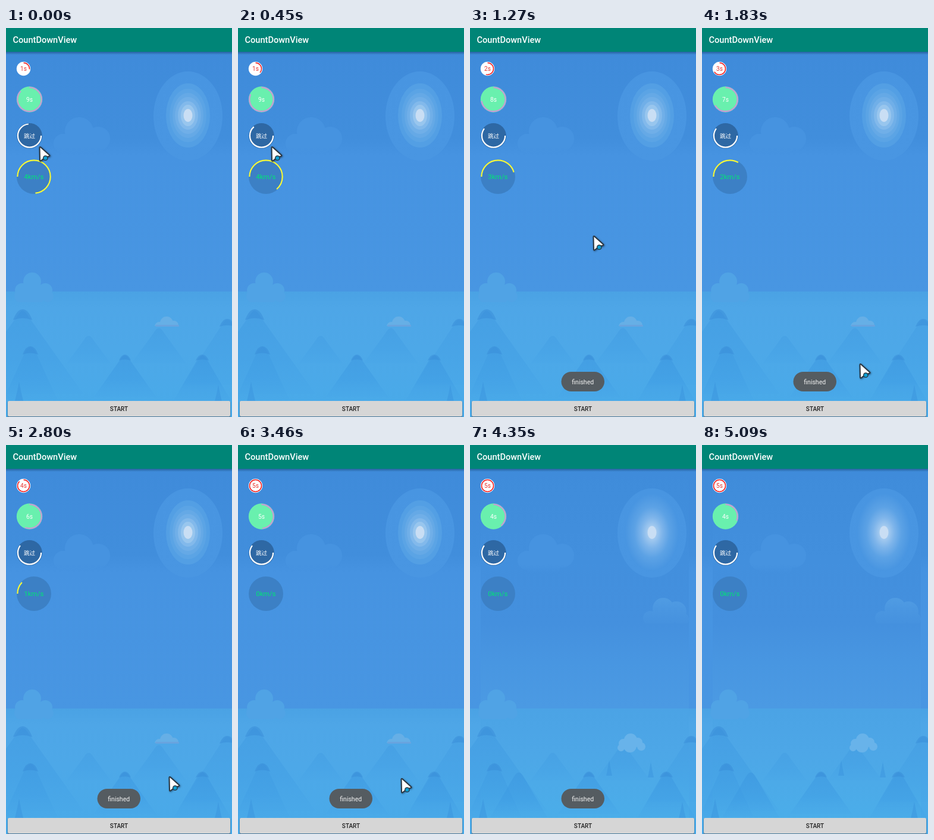
These frames come from a looping animation (380x654 px, 5190 ms). An HTML page with a canvas:

```html
<!DOCTYPE html>
<html lang="en">
<head>
<meta charset="utf-8">
<title>CountDownView</title>
<style>
html, body { margin: 0; width: 100%; height: 100%; overflow: hidden; background: #4896e2; }
canvas { display: block; }
</style>
</head>
<body>
<canvas id="stage" width="380" height="654"></canvas>
<script>
const ctx = document.getElementById("stage").getContext("2d");
const W = 380, H = 654, LOOP = 5190, LAST = 5090, TAU = Math.PI * 2;
const SKIP_AT = 600;

// Cursor tip: time, x, y
const path = [
  [0, 56, 199], [600, 56, 199], [870, 132, 223], [1070, 194, 308], [1270, 207, 349],
  [1610, 213, 423], [1830, 265, 564], [1920, 267, 567], [2130, 274, 557], [2800, 274, 557],
  [3200, 275, 559], [3760, 273, 561], [3880, 316, 588], [4020, 342, 618], [4150, 342, 660]
];

const clamp = v => Math.max(0, Math.min(1, v));

function cursorAt(t) {
  const i = path.findIndex(p => p[0] > t);
  if (i < 0) return path[path.length - 1].slice(1);
  const [t0, x0, y0] = path[i - 1], [t1, x1, y1] = path[i];
  const k = (t - t0) / (t1 - t0);
  return [x0 + (x1 - x0) * k, y0 + (y1 - y0) * k];
}

function vertical(y0, y1, ...stops) {
  const g = ctx.createLinearGradient(0, y0, 0, y1);
  stops.forEach(([y, color]) => g.addColorStop((y - y0) / (y1 - y0), color));
  return g;
}

function ellipse(x, y, rx, ry, fill) {
  ctx.beginPath();
  ctx.ellipse(x, y, rx, ry, 0, 0, TAU);
  ctx.fillStyle = fill;
  ctx.fill();
}

const disc = (x, y, r, fill) => ellipse(x, y, r, r, fill);

function box(x, y, w, h, r, fill) {
  ctx.beginPath();
  ctx.roundRect(x, y, w, h, r);
  ctx.fillStyle = fill;
  ctx.fill();
}

function arc(x, y, r, start, sweep, width, color) {
  if (sweep <= 0) return;
  const from = start * TAU / 360;
  ctx.beginPath();
  ctx.arc(x, y, r, from, from + Math.min(sweep, 360) * TAU / 360);
  ctx.strokeStyle = color;
  ctx.lineWidth = width;
  ctx.stroke();
}

function label(text, x, y, size, color, weight = 400, align = "center") {
  ctx.font = `${weight} ${size}px Roboto, "Noto Sans CJK SC", "Noto Sans CJK", sans-serif`;
  ctx.textAlign = align;
  ctx.fillStyle = color;
  ctx.fillText(text, x, y);
}

// Puffs are [x, y, radius]; everything below the base line is cut off.
function cloud(puffs, base, fill) {
  ctx.save();
  ctx.beginPath();
  ctx.rect(0, 0, W, base);
  ctx.clip();
  ctx.beginPath();
  for (const [x, y, r] of puffs) {
    ctx.moveTo(x + r, y);
    ctx.arc(x, y, r, 0, TAU);
  }
  ctx.fillStyle = fill;
  ctx.fill();
  ctx.restore();
}

function peak(x, y, half, h, alpha) {
  ctx.beginPath();
  ctx.moveTo(x - half, y + h);
  ctx.lineTo(x - 9, y + 9);
  ctx.quadraticCurveTo(x, y - 8, x + 9, y + 9);
  ctx.lineTo(x + half, y + h);
  ctx.fillStyle = vertical(y, y + h, [y, `rgba(58,148,222,${alpha})`],
    [y + h * .6, `rgba(58,152,226,${alpha * .75})`], [y + h, "rgba(66,160,230,.12)"]);
  ctx.fill();
}

function cap(x, y, w, h) {
  ctx.beginPath();
  ctx.moveTo(x - w, y + h);
  ctx.quadraticCurveTo(x - w * .6, y, x, y);
  ctx.quadraticCurveTo(x + w * .6, y, x + w, y + h);
  ctx.quadraticCurveTo(x, y + h * .65, x - w, y + h);
  ctx.fillStyle = "rgba(56,140,216,.5)";
  ctx.fill();
}

function spike(x, y, w, h) {
  ctx.beginPath();
  ctx.moveTo(x - w, y + h);
  ctx.quadraticCurveTo(x - w * .4, y + h * .5, x, y);
  ctx.quadraticCurveTo(x + w * .4, y + h * .5, x + w, y + h);
  ctx.fillStyle = "rgba(58,148,222,.5)";
  ctx.fill();
}

function sun(smooth) {
  ellipse(306, 148, 58, 75, vertical(73, 223, [73, "#4895e1"], [223, "#4996e2"]));
  if (smooth) {
    ctx.save();
    ctx.translate(306, 147);
    ctx.scale(1, 1.45);
    const g = ctx.createRadialGradient(0, 0, 6, 0, 0, 45);
    [[0, "#a9cdf0"], [.3, "#7db4ea"], [.6, "#5ca2e5"], [1, "#4895e1"]].forEach(s => g.addColorStop(...s));
    disc(0, 0, 45, g);
    ctx.restore();
  } else {
    [[37, 54, "#539fe4"], [31, 45, "#5ba4e5"], [26, 38, "#65a9e6"], [22, 31, "#70afe8"],
     [17, 24, "#82b9eb"], [12, 18, "#98c6ee"]].forEach(([rx, ry, c]) => ellipse(306, 147, rx, ry, c));
  }
  ellipse(306, 147, 7.5, 11, "#c9def4");
}

function scenery(late) {
  ctx.fillStyle = late
    ? vertical(40, 443, [40, "#3f8cda"], [190, "#428fdd"], [300, "#4490de"], [364, "#4896e1"], [443, "#4b9ae3"])
    : vertical(40, 443, [40, "#3f8bda"], [185, "#418edc"], [215, "#4693e1"], [443, "#4896e2"]);
  ctx.fillRect(0, 40, W, 404);
  sun(late);
  cloud([[123, 174, 24], [96, 194, 16], [155, 186, 20], [123, 205, 28]], 215,
    vertical(150, 215, [150, "#4693e0"], [200, "#4693e0"], [215, "rgba(70,147,225,0)"]));
  if (late) {
    cloud([[325, 275, 18], [303, 291, 12], [347, 280, 17], [356, 293, 12], [325, 291, 20]], 300,
      vertical(257, 300, [257, "#509ce3"], [300, "rgba(76,152,226,.2)"]));
  }
  ctx.fillStyle = late
    ? vertical(443, H, [443, "#4ba3e5"], [520, "#4da7e7"], [H, "#4aafea"])
    : vertical(443, H, [443, "#4aa2e4"], [470, "#4ea6e7"], [540, "#4da8e8"], [H, "#48aae9"]);
  ctx.fillRect(0, 443, W, H - 443);
  cloud([[44, 426, 15], [27, 441, 12], [66, 441, 12], [25, 451, 11], [70, 451, 10], [46, 447, 20]], 461, "#50a3e5");

  peak(28, 475, 102, 140, .38);
  peak(139, 517, 37, 47, .28);
  peak(257, 504, 46, 60, .34);
  peak(372, 490, 75, 110, .3);
  peak(200, 550, 52, 70, .5);
  peak(330, 550, 48, 76, .5);
  peak(41, 536, 45, 88, .35);
  if (late) peak(82, 550, 48, 76, .5);
  cap(28, 473, 16, 18);
  cap(372, 489, 13, 13);
  cap(41, 535, 13, 14);
  cap(200, 549, 10, 10);
  cap(330, 549, 11, 10);
  spike(22, 595, 7, 32);
  spike(357, 600, 6, 28);
  if (late) {
    spike(234, 530, 5, 26);
    spike(304, 533, 5, 26);
  }
  cloud([[270, 496, 11], [258, 502, 8], [282, 500, 8], [288, 507, 7], [269, 506, 11], [254, 509, 6]],
    late ? 519 : 501, late ? "#68b3ea" : "#66afe6");
  if (!late) box(251, 499, 40, 3, 1.5, "#68a4df");
}

function chrome() {
  ctx.fillStyle = vertical(40, 45, [40, "rgba(10,50,90,.45)"], [45, "rgba(10,50,90,0)"]);
  ctx.fillRect(0, 40, W, 5);
  ctx.fillStyle = "#008577";
  ctx.fillRect(0, 0, W, 40);
  label("CountDownView", 11.5, 24.5, 14.6, "#fff", 500, "left");
  box(2.5, 627.5, 375, 27, 2, "rgba(70,95,115,.65)");
  box(3, 627, 374, 26, 2, "#d6d6d6");
  label("START", 190, 643.5, 10, "#202020", 500);
}

function counters(t) {
  const clock = ms => 1.32 + ms * .0011;
  const now = clock(t), up = Math.min(now, 5), left = 5 - up;

  disc(29.5, 68.5, 11.7, "#fff");
  arc(29.5, 68.5, 10, -90, up * 72, 1.5, "#f01a1a");
  label(Math.floor(up) + "s", 29.5, 72.2, 10, "#e5322d");

  disc(39.5, 120, 21.7, "#69f0ae");
  arc(39.5, 120, 20.2, -90, (10 - now) * 36, 2.2, "#ca98d6");
  label(Math.ceil(10 - now) + "s", 39.5, 123.7, 10.2, "#fff");

  disc(39.5, 181.5, 21.5, "rgba(30,75,125,.35)");
  disc(39.5, 181, 21, "#2e68a4");
  arc(39.5, 181, 19.6, 0, (5 - clock(Math.min(t, SKIP_AT))) * 72, 2.2, "#fff");
  label("跳过", 39.5, 184.5, 9.5, "#fff");

  disc(47, 250, 29, "#3c80c5");
  arc(47, 250, 27.7, 180, left * 72, 2.2, "#f6f93a");
  label(Math.ceil(left) + "km/s", 46.8, 254.2, 11.6, "#00e676");
}

function toast(t) {
  ctx.globalAlpha = clamp((t - 660) / 330) * clamp((4800 - t) / 450);
  box(153.5, 578, 72.5, 33, 16.5, "#555c61");
  label("finished", 189.7, 598.7, 10.5, "#f2f2f2");
  ctx.globalAlpha = 1;
}

function cursor([x, y]) {
  ctx.save();
  ctx.translate(x, y);
  ctx.beginPath();
  ctx.moveTo(1.5, 2);
  ctx.lineTo(16.5, 15.5);
  ctx.lineTo(9, 18);
  ctx.lineTo(2, 23.5);
  ctx.closePath();
  ctx.lineJoin = "round";
  ctx.lineWidth = 4;
  ctx.strokeStyle = "#2a3742";
  ctx.shadowColor = "rgba(0,20,40,.5)";
  ctx.shadowBlur = 3;
  ctx.shadowOffsetX = ctx.shadowOffsetY = 1;
  ctx.stroke();
  ctx.shadowColor = "transparent";
  ctx.fillStyle = "#fff";
  ctx.fill();
  disc(10.3, 19.7, 4.4, "#2a3742");
  disc(10.3, 19.7, 3, "#0d9fd2");
  ctx.restore();
}

function draw(ms) {
  const t = Math.min(ms % LOOP, LAST), tip = cursorAt(t);
  scenery(false);
  // The richer backdrop follows the cursor's last sweep to the right.
  if (t > 3790) {
    ctx.save();
    ctx.beginPath();
    ctx.rect(18, 59, tip[0] + 26 - 18, H - 59);
    ctx.clip();
    scenery(true);
    ctx.restore();
  }
  counters(t);
  toast(t);
  chrome();
  if (t < 4150) cursor(tip);
}

let start;
function tick(now) {
  start ??= now;
  draw(now - start);
  requestAnimationFrame(tick);
}
draw(0);
requestAnimationFrame(tick);
</script>
</body>
</html>
```
